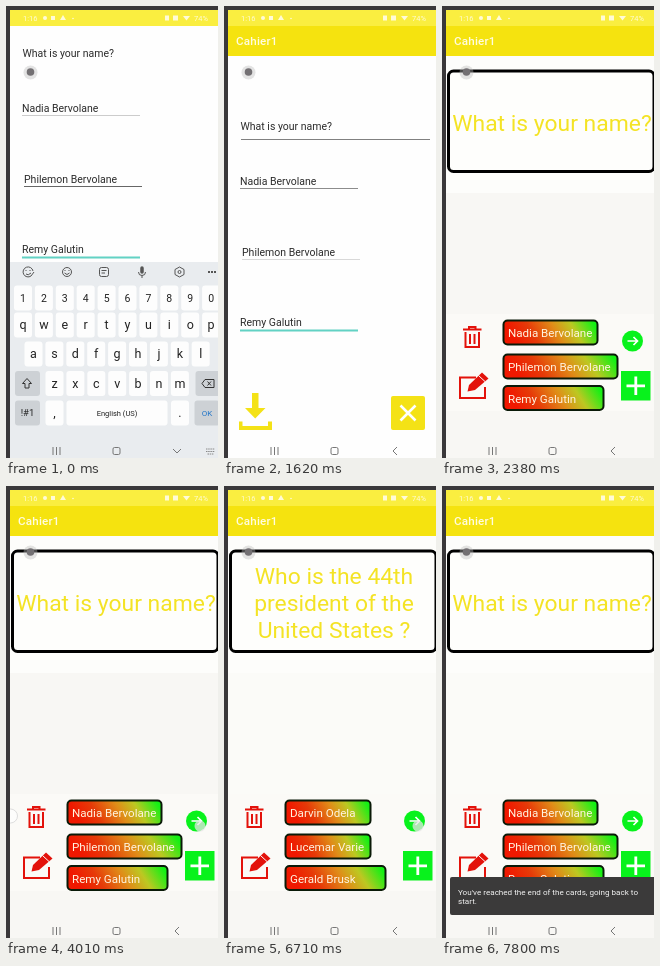
An HTML page for the animation above (8000 ms loop, 212 by 452 pixels).

```html
<!DOCTYPE html>
<html lang="en">
<head>
<meta charset="utf-8">
<style>
  html, body { margin: 0; width: 100%; height: 100%; overflow: hidden; background: #3a383a; }
  svg { display: block; width: 212px; height: 452px; font-family: Roboto, sans-serif; }
  .input { font-size: 10.5px; fill: #2c2c2c; }
  .title { font-size: 11.6px; font-weight: 500; fill: #fffce0; letter-spacing: .2px; }
  .question { font-size: 22.9px; fill: #f4e325; text-anchor: middle; }
  .answer { font-size: 11.6px; fill: #fff4e0; }
  .line { fill: none; stroke: #808080; }
  .red { fill: none; stroke: #e3120b; stroke-width: 2; }
  .key { text-anchor: middle; fill: #222; }
</style>
</head>
<body>
<svg viewBox="0 0 212 452">
  <defs>
    <linearGradient id="heat" x2="1" y2="-.15">
      <stop offset="0" stop-color="#f01800"/>
      <stop offset=".22" stop-color="#e63a08"/>
      <stop offset=".48" stop-color="#e08c18"/>
      <stop offset=".68" stop-color="#bcc822"/>
      <stop offset=".92" stop-color="#14f014"/>
    </linearGradient>
  </defs>
  <rect width="212" height="452" fill="#faf05a"/>

  <g id="deck">
    <rect y="50" width="212" height="402" fill="#f8f7f4"/>
    <rect y="50" width="212" height="137" fill="#fdfdfb"/>
    <rect id="gap" y="187" width="212" height="121"/>
    <rect y="308" width="212" height="97" fill="#fbfaf7"/>
    <rect y="20" width="212" height="30" fill="#f5e30f"/>
    <text class="title" x="12" y="39">Cahier1</text>
    <rect x="6.5" y="65" width="205.5" height="100.5" rx="5" fill="#fefefc" stroke="#000" stroke-width="3"/>
    <g id="card"></g>
    <g class="red">
      <path d="M21 323.5H39.500M27 323V321H33.500V323M23.500 326V341H37V326M28 328V338M32.500 328V338"/>
      <path d="M34 371.500H18V392H43V381"/>
      <path d="M25.500 385.500L27 379 40 366.500 46.500 372.500 33 384Z" fill="#e3120b" stroke="none"/>
      <path d="M36.500 369.500L43 375.500" stroke="#fff" stroke-width="1"/>
    </g>
    <circle cx="190.500" cy="335" r="10.500" fill="#08f21c"/>
    <path d="M185.500 335H195M191.500 331L195.500 335 191.500 339" fill="none" stroke="#fff" stroke-width="1.700"/>
    <rect x="179" y="365" width="29.500" height="29.500" fill="#08f21c"/>
    <path d="M184.500 379.800H203M193.800 370.500V389" stroke="#fff" stroke-width="2.800"/>
  </g>

  <g id="form">
    <rect y="50" width="212" height="500" fill="#fefefe"/>
    <rect y="20" width="212" height="30" fill="#f5e30f"/>
    <text class="title" x="12" y="39">Cahier1</text>
    <g class="input">
      <text x="16.500" y="124">What is your name?</text>
      <text x="16" y="178.500">Nadia Bervolane</text>
      <text x="18" y="249.500">Philemon Bervolane</text>
      <text x="16" y="320">Remy Galutin</text>
    </g>
    <path id="topLine" class="line" d="M17 133.500H206"/>
    <path id="firstLine" class="line" d="M16 182.500H134"/>
    <path id="secondLine" class="line" d="M18 253.500H136"/>
    <path d="M16 324.500H134" stroke="#62d2c4" stroke-width="2"/>
    <path id="caret" d="M79.500 310V323" stroke="#20b8a4"/>
    <path d="M28 387H34.500V402H41.500L31.200 412.500 21 402H28ZM15 415.500H18.500V420H44V415.500H48V424H15Z" fill="#f4e216"/>
    <rect x="167" y="390" width="34" height="34" rx="2" fill="#f4e216"/>
    <path d="M176.500 399.500L191.500 414.500M191.500 399.500L176.500 414.500" stroke="#fff" stroke-width="2.600"/>
  </g>

  <rect width="212" height="20" fill="#faee40"/>
  <g fill="#fffbd8" font-size="7.500">
    <text x="17" y="15">1:16</text>
    <circle cx="39" cy="12" r="2"/>
    <rect x="45" y="10" width="4" height="4"/>
    <path d="M54 14L57 9 60 14Z"/>
    <circle cx="67" cy="12.500" r=".8"/>
    <rect x="159" y="9.500" width="4" height="5"/>
    <rect x="167" y="9.500" width="5" height="5"/>
    <path d="M177 10H184L180.500 14.500Z"/>
    <text x="188" y="15">74%</text>
  </g>

  <g id="keyboard"></g>

  <g fill="none" stroke="#777">
    <path d="M47 441V449M50.500 441V449M54 441V449"/>
    <rect x="107" y="441.500" width="7" height="7" rx="1.500"/>
    <path id="back"/>
  </g>

  <circle cx="24.500" cy="66.500" r="7" fill="#bbb" opacity=".4"/>
  <circle cx="24.500" cy="66" r="3.800" fill="#737073"/>
  <circle id="edge" cx="4.500" cy="330" r="7" fill="#fff" fill-opacity=".6" stroke="#ddd"/>
  <circle id="touch" r="5.500" fill="#e4e4e4" opacity=".75"/>

  <g id="toast">
    <rect x="8" y="391" width="210" height="38" rx="2" fill="#3b3a3a"/>
    <g fill="#f2f2f2" font-size="8.100">
      <text x="16" y="408.500">You've reached the end of the cards, going back to</text>
      <text x="16" y="418">start.</text>
    </g>
  </g>
  <path d="M0 0H212V4H4V452H0Z" fill="#3a383a"/>
</svg>
<script>
const $ = id => document.getElementById(id);
const show = (id, on) => $(id).style.display = on ? '' : 'none';
const text = (x, y, label, attrs) => `<text x="${x}" y="${y}" ${attrs}>${label}</text>`;

const cards = [
  { lines: ['What is your name?'], widths: [94, 114, 100],
    answers: ['Nadia Bervolane', 'Philemon Bervolane', 'Remy Galutin'] },
  { lines: ['Who is the 44th', 'president of the', 'United States ?'], widths: [85, 85, 100],
    answers: ['Darvin Odela', 'Lucemar Varie', 'Gerald Brusk'] }
].map(({ lines, widths, answers }) =>
  lines.map((line, i) => text(110, 125 + 27 * (i - (lines.length - 1) / 2), line, 'class="question"')).join('') +
  answers.map((name, i) => {
    const y = [314.5, 348.5, 380][i];
    return `<rect x="61.500" y="${y}" width="${widths[i]}" height="24" rx="4" fill="url(#heat)" stroke="#0a1a08" stroke-width="2"/>` +
      text(66, y + 16.7, name, 'class="answer"');
  }).join(''));

function key(x, y, width, label = '', { size = 12.5, fill = '#fdfdfd', color = '#222' } = {}) {
  return `<rect x="${x - width / 2}" y="${y - 12.5}" width="${width}" height="25" rx="3" fill="${fill}"/>` +
    text(x, y + size * .34, label, `class="key" font-size="${size}" style="fill:${color}"`);
}

function buildKeyboard() {
  const dark = '#cdd1d5';
  const row = (chars, x, y, size) =>
    [...chars].map((c, i) => key(x + 20.9 * i, y, 18, c, { size })).join('');
  return `<rect y="256" width="212" height="270" fill="#e9ecef"/>
    <g fill="none" stroke="#555">
      <path d="M27 265A5 5 0 1 0 25 270M20 264V265M24 264V265M20 268Q22 270 25 267M25 270L28 266"/>
      <circle cx="61" cy="266" r="4.500"/><path d="M59 264V265M63 264V265M58.500 267Q61 270 63.500 267"/>
      <rect x="93.500" y="261.500" width="9" height="9" rx="2"/><path d="M95.500 264.500H100.500M95.500 267H99"/>
      <path d="M132.500 266Q132.500 269.500 136 269.500T139.500 266M136 269.500V272"/>
      <path d="M136 262V266" stroke-width="3.500" stroke-linecap="round"/>
      <path d="M173.500 261L178 263.500V268.500L173.500 271 169 268.500V263.500Z"/><circle cx="173.500" cy="266" r="1.500"/>
      <path d="M202 266H210" stroke-width="2" stroke-dasharray="2 1"/>
    </g>` +
    row('1234567890', 17, 292, 10.5) + row('qwertyuiop', 17, 319) +
    row('asdfghjkl', 27.5, 348) + row('zxcvbnm', 48.5, 377.5) +
    key(21.5, 377.5, 25, '', { fill: dark }) + key(202, 377.5, 25, '', { fill: dark }) +
    key(21.5, 407, 25, '!#1', { size: 9.5, fill: dark }) + key(48.5, 407, 18, ',') +
    key(111, 407, 101, 'English (US)', { size: 7.5 }) + key(174, 407, 18, '.') +
    key(201, 407, 25, 'OK', { size: 8, fill: dark, color: '#2577c8' }) +
    `<g fill="none" stroke="#333">
      <path d="M21 372.500L16.500 377.500H19V382H23V377.500H25.500Z"/>
      <path d="M196 377.500L199 373.500H208V381.500H199ZM201.500 375.500L205 379.500M205 375.500L201.500 379.500"/>
      <path d="M200 443H209M200 445.500H209M201.500 448H207.500" stroke="#888" stroke-dasharray="1.500 .7"/>
    </g>`;
}
$('keyboard').innerHTML = buildKeyboard();

const taps = [[370, 640, 202, 409], [4010, 4250, 194, 340], [5360, 5480, 194, 340], [6710, 6950, 194, 340]];
let current;

function draw(t) {
  const within = (from, to) => t >= from && t < to;
  const typing = t < 760;

  // The keyboard closes and the form pans back, then the form drops away.
  const shift = t < 640 ? -73 : t < 760 ? -30 : t < 1990 ? 0 : t < 2110 ? 4 : t < 2230 ? 17 : 24;
  $('form').setAttribute('transform', `translate(0 ${shift})`);
  $('form').setAttribute('opacity', t < 2230 ? 1 : .4);
  show('form', t < 2380);
  show('deck', t >= 2230);
  show('keyboard', typing);
  $('keyboard').setAttribute('transform', `translate(0 ${t < 640 ? 0 : 110})`);
  show('topLine', t >= 640);
  $('firstLine').style.stroke = t < 640 ? '#ccc' : '#8c8c8c';
  $('secondLine').style.stroke = t < 640 ? '#666' : '#d8d8d8';
  show('caret', within(370, 640));
  $('back').setAttribute('d', typing ? 'M167 443L171 447 175 443' : 'M173 441L169 445 173 449');

  const index = +within(5480, 6950);
  if (index !== current) $('card').innerHTML = cards[current = index];
  $('gap').setAttribute('fill', t < 5480 ? '#f8f7f4' : '#fbfbf8');

  const tap = taps.find(([from, to]) => within(from, to));
  show('touch', tap);
  if (tap) $('touch').setAttribute('transform', `translate(${tap[2]} ${tap[3]})`);
  show('edge', within(3270, 4620));
  $('toast').setAttribute('opacity', Math.min(1, Math.max(0, (t - 7000) / 250)));
}

function frame() {
  draw(performance.now() % 8000);
  requestAnimationFrame(frame);
}
frame();
</script>
</body>
</html>
```
